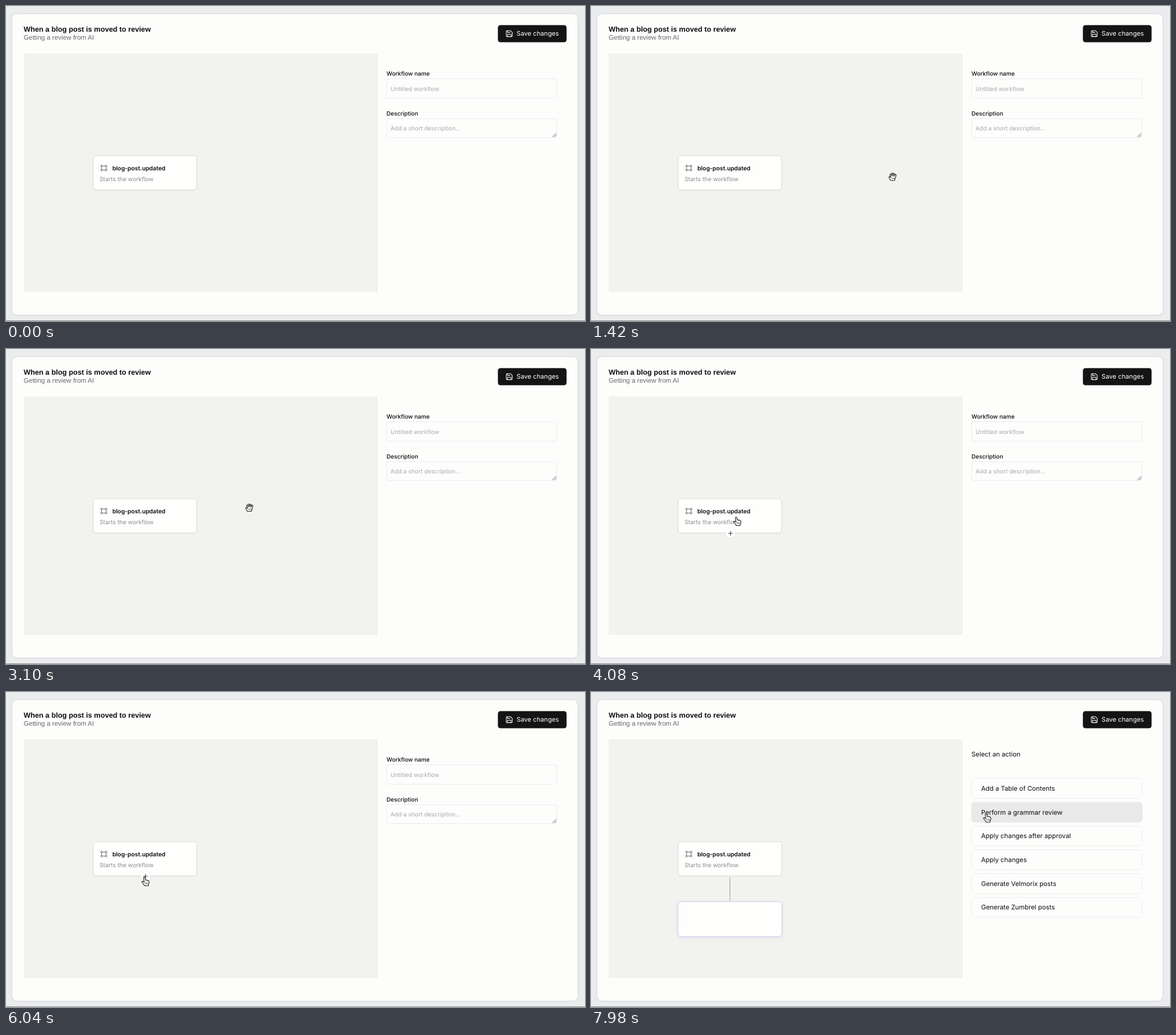
These frames come from a looping animation (1015x552 px, 8 s). An HTML page:

```html
<!DOCTYPE html>
<html lang="en">
<head>
<meta charset="utf-8">
<title>Workflow editor</title>
<style>
  html, body { margin: 0; width: 100%; height: 100%; overflow: hidden; background: #ebecee; }
  svg { display: block; }
  text { font: 10.3px Inter, sans-serif; fill: #0c0c0e; text-rendering: geometricPrecision; }
  .head { font-family: "Liberation Sans", Arial, sans-serif; }
  .label { font-size: 10.15px; font-weight: 500; }
  .hint { fill: #a9a9af; }
  .action { font-size: 11.35px; }
  .field { fill: #fdfdfc; stroke: #ececf1; }
  .node { fill: #fefefd; stroke: #dedee4; }
  .line { fill: none; stroke: #77777d; }
  .hand { fill: #fff; stroke: #1a1a1a; stroke-width: 1.1; stroke-linejoin: round; stroke-linecap: round; }
</style>
</head>
<body>
<svg width="1015" height="552" viewBox="0 0 1015 552">
  <defs>
    <filter id="soft" x="-10%" y="-20%" width="120%" height="150%">
      <feDropShadow dx="0" dy=".6" stdDeviation="1" flood-color="#30304a" flood-opacity=".07"/>
    </filter>
    <filter id="glow" x="-10%" y="-25%" width="120%" height="150%">
      <feDropShadow dx="0" dy="1" stdDeviation="2.5" flood-color="#6468b8" flood-opacity=".2"/>
    </filter>
  </defs>

  <rect x="10.5" y="13.5" width="992" height="528" rx="9" fill="#fdfdfb" stroke="#d9dbe5" filter="url(#soft)"/>
  <rect y="551" width="1015" height="1" fill="#8b8b8d"/>
  <text class="head" x="31" y="44.5" style="font-size:12.7px;font-weight:700">When a blog post is moved to review</text>
  <text class="head" x="31" y="59" style="font-size:11.55px;fill:#68686f">Getting a review from AI</text>

  <rect x="862.3" y="33.5" width="120.4" height="30" rx="4.5" fill="#141414"/>
  <g transform="translate(876 42.2) scale(.52)" fill="none" stroke="#fff" stroke-width="2" stroke-linejoin="round">
    <path d="M4 2H16L22 8V20a2 2 0 0 1-2 2H4a2 2 0 0 1-2-2V4a2 2 0 0 1 2-2ZM6 2V8H15M6 22V14H18V22"/>
  </g>
  <text x="895" y="52.2" style="font-size:11.2px;fill:#fff">Save changes</text>

  <rect x="31" y="83" width="620" height="418" fill="#f2f3ef"/>
  <path d="M650.5 83V501" stroke="#e8e8e6"/>

  <g id="details">
    <text class="label" x="667" y="122">Workflow name</text>
    <rect class="field" x="667.5" y="127.5" width="298" height="34" rx="3.5"/>
    <text class="hint" x="674" y="148.5">Untitled workflow</text>
    <text class="label" x="667" y="191.5">Description</text>
    <rect class="field" x="667.5" y="197.5" width="298" height="33" rx="3.5"/>
    <text class="hint" x="674" y="218">Add a short description...</text>
    <path d="M958 229.5l6.5-6.5M961.5 229.5l3-3" stroke="#55555a"/>
  </g>

  <g id="actions">
    <text class="action" x="667" y="113">Select an action</text>
  </g>

  <g id="step">
    <path d="M243.5 324.5V366" stroke="#a6a6ad" stroke-width="1.2"/>
    <rect x="152.5" y="367.5" width="182" height="61" rx="5.5" fill="#fefefd" stroke="#d0d2ef" filter="url(#glow)"/>
  </g>
  <rect class="node" x="153" y="262.5" width="181" height="59.5" rx="5" filter="url(#soft)"/>
  <g class="line">
    <path d="M169 280.5h5M169 287.5h5M167.5 282v4M175.5 282v4"/>
    <path d="M166.2 279h2.6v2.6h-2.6zM174.2 279h2.6v2.6h-2.6zM166.2 286.2h2.6v2.6h-2.6zM174.2 286.2h2.6v2.6h-2.6z" fill="#fff"/>
  </g>
  <text x="186.5" y="287.5" style="font-weight:600">blog-post.updated</text>
  <text x="164" y="306.5" style="fill:#8d8d93">Starts the workflow</text>

  <g id="plus">
    <circle cx="244.5" cy="323" r="8" fill="#fefefd" filter="url(#soft)"/>
    <path d="M240.5 323h8M244.5 319v8" stroke="#333338"/>
  </g>

  <g id="cursor">
    <path id="arrow" d="M0 0V12L2.8 9.5 4.8 14 6.8 13.1 4.9 8.8H8.6Z" fill="#000" stroke="#fff" stroke-width="1"/>
    <g id="grab" class="hand">
      <path d="M-3.5 6.5L-6.2 1.6C-7-.2-5-1-4 .6L-3.2 1.6-4.6-3C-5-4.8-3-5.4-2.5-3.6L-1.7-1-1.8-5.2C-1.8-7 .2-7 .3-5.2L.5-1.2 1.3-4.9C1.8-6.6 3.6-6 3.3-4.4L2.7-.8 4.2-3.4C5-4.8 6.7-4 6.1-2.4 5.5-.4 5.5 2 3.8 4.5L3.6 6.5Z"/>
      <path d="M-1 2v2M1 2v2M3 2v2" stroke-width=".7"/>
    </g>
    <g id="point" class="hand">
      <path d="M-1.8 1.2C-2.1-.9 .4-1.1 .8 .9L1.6 4.8C2.4 3.9 3.8 4.2 4 5.2 5 4.6 6 5 6.2 6 7.2 5.6 8 6.3 8 7.5 8.1 9.8 7.4 11 6.5 12.6V14.5H-.8V13L-4.4 8.9C-5.7 7.2-3.8 6-2.6 7.1L-.8 8.6Z"/>
      <path d="M1.3 9v2.5M3.3 9v2.5M5.3 9v2.5" stroke-width=".7"/>
    </g>
  </g>
</svg>
<script>
const LOOP = 8000, CLICK = 6160;
const $ = id => document.getElementById(id);
const show = (id, on) => $(id).style.display = on ? '' : 'none';
const inside = (x, y, l, t, r, b) => x >= l && x <= r && y >= t && y <= b;

const labels = ['Add a Table of Contents', 'Perform a grammar review', 'Apply changes after approval',
  'Apply changes', 'Generate Velmorix posts', 'Generate Zumbrel posts'];
const rowTop = i => 151.5 + 41.7 * i;

function add(tag, attrs) {
  const el = document.createElementNS('http://www.w3.org/2000/svg', tag);
  for (const key in attrs) el.setAttribute(key, attrs[key]);
  return $('actions').appendChild(el);
}
const rows = labels.map((label, i) => {
  const rect = add('rect', { class: 'field', x: 667, y: rowTop(i), width: 299.5, height: 35, rx: 5.5 });
  add('text', { class: 'action', x: 684, y: rowTop(i) + 21.3 }).textContent = label;
  return rect;
});

// Pointer moves: start, end, from x, from y, to x, to y
const moves = [
  [150, 720, 705, 565, 671, 392],
  [840, 1680, 671, 392, 487, 272],
  [2700, 3900, 487, 272, 255, 295],
  [4300, 5100, 255, 295, 243, 325],
  [6500, 6800, 243, 325, 244, 325],
  [7000, 7900, 244, 325, 693, 213.5]
];

function pointerAt(t) {
  const [start, end, x0, y0, x1, y1] = moves.filter(m => m[0] <= t).pop() || moves[0];
  const p = Math.min(1, Math.max(0, (t - start) / (end - start)));
  const ease = p * p * (3 - 2 * p);
  return [x0 + (x1 - x0) * ease, y0 + (y1 - y0) * ease];
}

function draw(t) {
  const [x, y] = pointerAt(t);
  const picking = t >= CLICK;
  const onNode = inside(x, y, 153, 262, 334, 323) || inside(x, y, 236, 315, 253, 331);
  const onRow = rows.map((_, i) => picking && inside(x, y, 667, rowTop(i), 967, rowTop(i) + 35));
  const pointing = onNode || onRow.includes(true);
  const onCanvas = inside(x, y, 31, 83, 651, 501);

  show('details', !picking);
  show('actions', picking);
  show('step', picking);
  show('plus', onNode);
  rows.forEach((row, i) => row.style.fill = row.style.stroke = onRow[i] ? '#e9e9e9' : '');
  show('point', pointing);
  show('grab', onCanvas && !pointing);
  show('arrow', !onCanvas && !pointing);
  $('cursor').setAttribute('transform', `translate(${x} ${y})`);
}

function tick() {
  draw(performance.now() % LOOP);
  requestAnimationFrame(tick);
}
tick();
</script>
</body>
</html>
```
